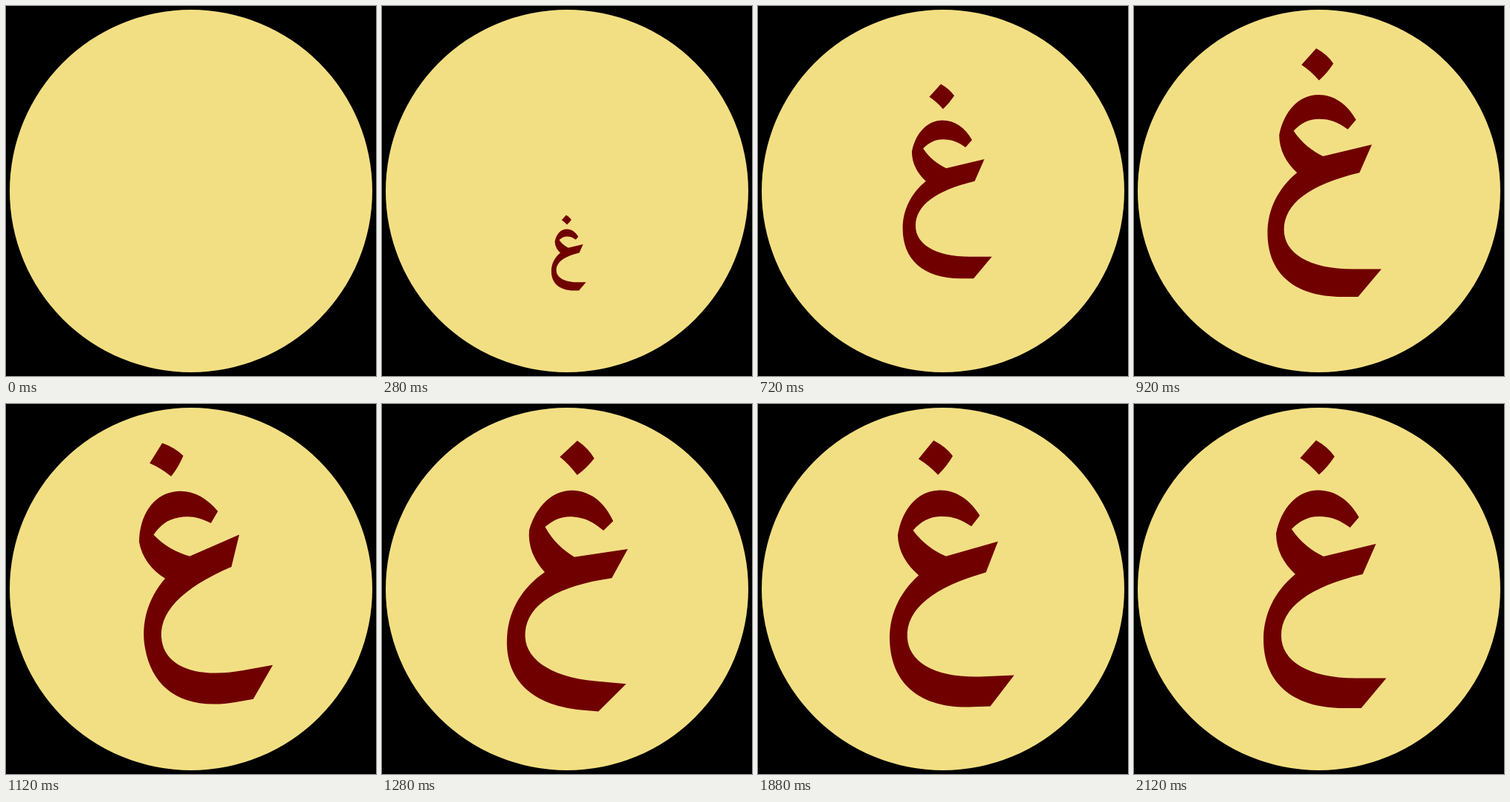
Recreate the animation shown at these times as an HTML page. Size 500 px wide and 500 px high, loop 2.8 s.

```html
<!DOCTYPE html>
<html lang="ar">
<head>
<meta charset="utf-8">
<title>Bouncing letter</title>
<style>
  html, body { margin: 0; height: 100%; overflow: hidden; background: #000; }
  svg { display: block; width: 100%; height: 100%; }
</style>
</head>
<body>
<svg viewBox="0 0 500 500">
  <circle cx="250" cy="250" r="245" fill="#f3df83"/>
  <g id="letter" fill="#700000">
    <path d="M246 49Q262 58 271 71Q262 85 250 95.500Q238 82 224.500 73Z"/>
    <path d="M304 153C291 130 272 116.500 249 116.500C221 116.500 199 140 192 175
      C192 197 202 215 218 230C190 253 175 284 175 318C175 374 211 411 284 411
      H307L341 370.500H300C235 370.500 199 347 199 313C199 275 237 247 309 230
      L327 189L256 206C240 198 225 187 213 169C224 158 235 152 250 152
      C267 152 278 157 292 167Z"/>
  </g>
</svg>
<script>
const LOOP = 2800, STEP = 40, GROW = 992, BASE = 161, HOP = 95.6;
const letter = document.getElementById('letter');
const ease = u => u < 0.5 ? 4 * u ** 3 : 1 - 4 * (1 - u) ** 3;

// Swing keys: [step, degrees]
const swing = [[0, 0], [4, -10], [10.6, 10], [13, 0]];

function angle(n) {
  for (let i = 1; i < swing.length; i++) {
    const [n0, a0] = swing[i - 1], [n1, a1] = swing[i];
    if (n >= n0 && n < n1) return a0 + (a1 - a0) * ease((n - n0) / (n1 - n0));
  }
  return 0;
}

function draw(now) {
  const t = Math.floor(now % LOOP / STEP) * STEP;
  const s = Math.min(t / GROW, 1);
  // Grows from the baseline while hopping above it
  const y = 250 + BASE * (1 - s) - HOP * (s - s ** 4);
  const turn = angle((t - 960) / STEP) + angle((t - 1600) / STEP);
  letter.setAttribute('visibility', s ? 'visible' : 'hidden');
  letter.setAttribute('transform',
    `translate(250 ${y}) rotate(${turn}) scale(${s}) translate(-250 -250)`);
}

let start;
function tick(now) {
  start ??= now;
  draw(now - start);
  requestAnimationFrame(tick);
}
draw(0);
requestAnimationFrame(tick);
</script>
</body>
</html>
```
